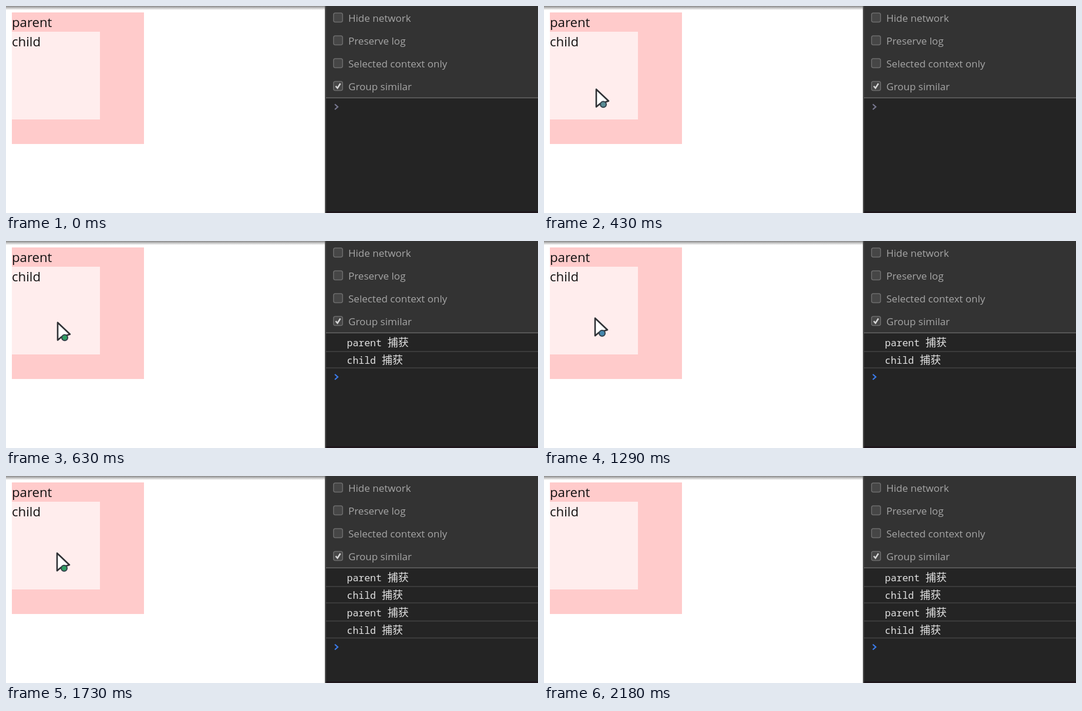
An HTML page that plays this animation: 906x354 px, repeating every 2.83 s.

```html
<!DOCTYPE html>
<html lang="en">
<head>
<meta charset="utf-8">
<title>Event capture demo</title>
<style>
html, body { margin: 0; width: 100%; height: 100%; overflow: hidden; background: #fff; }
svg { display: block; width: 906px; height: 354px; }
.page { font: 22.2px "Open Sans", "Noto Sans", sans-serif; fill: #111; }
.option { font: 17.05px "Open Sans", "Noto Sans", sans-serif; fill: #a6a6a6; }
.log { font: 16.5px "Noto Sans Mono", "DejaVu Sans Mono", monospace; fill: #e2e2e2; white-space: pre; }
.cjk { font: 18px "Noto Sans CJK SC", "Noto Sans CJK", sans-serif; }
</style>
</head>
<body>
<svg viewBox="0 0 906 354">
  <defs>
    <linearGradient id="shade" x2="0" y2="1">
      <stop offset="0" stop-color="#858585"/>
      <stop offset=".35" stop-color="#b5b5b5"/>
      <stop offset="1" stop-color="#fff"/>
    </linearGradient>
  </defs>
  <rect width="906" height="354" fill="#fff"/>
  <rect width="543" height="7" fill="url(#shade)"/>
  <rect x="10" y="11" width="225" height="225" fill="#ffcbcb"/>
  <rect x="10" y="44" width="150" height="150" fill="#ffeded"/>
  <text class="page" x="10" y="36">parent</text>
  <text class="page" x="10" y="69">child</text>

  <rect x="543" width="363" height="354" fill="#242424"/>
  <rect x="545" width="361" height="156" fill="#333"/>
  <rect x="543" width="2" height="354" fill="#505050"/>
  <rect x="545" y="156" width="361" height="2" fill="#565656"/>
  <rect x="545" y="351" width="361" height="3" fill="#1f171c"/>
  <g id="options"></g>
  <g id="logs"></g>
  <path id="prompt" d="M-3 -4.5L2 0L-3 4.5" fill="none" stroke-width="2.2"/>

  <circle id="click" r="18" fill="#fff57c"/>
  <g id="cursor">
    <path d="M1 1.5V31.5L7.5 26L22 21.5Z" fill="#fff" stroke="#303236" stroke-width="2.6" stroke-linejoin="round"/>
    <circle id="dot" cx="13" cy="27.3" r="5" stroke="#33404a" stroke-width="2"/>
  </g>
</svg>
<script>
const LOOP = 2830;
const $ = id => document.getElementById(id);

const BLUE = '#4487ad', TEAL = '#598c95', GREEN = '#2f9e63', GREY = '#a9adb0';

// time, pointer tip, dot colour
const pointer = [
  [0],
  [100, 307, 329, BLUE],
  [210, 238, 259, BLUE],
  [320, 128, 176, BLUE],
  [430, 88, 141, TEAL],
  [530, 87, 138, GREY],
  [630, 87, 138, GREEN],
  [1290, 86, 130.5, BLUE],
  [1410, 86, 130.5, TEAL],
  [1630, 86, 130.5, GREY],
  [1730, 86, 130.5, GREEN],
  [1840, 106, 140, BLUE],
  [1960, 193, 181, BLUE],
  [2060, 362, 327, BLUE],
  [2180]
];
const clicks = [[530, 630, 89, 140], [1630, 1730, 88, 132]];
const logTimes = [630, 630, 1730, 1730];
const dividers = [188, 216, 247, 276];

$('options').innerHTML =
  ['Hide network', 'Preserve log', 'Selected context only', 'Group similar'].map((label, i) => {
    const y = 12 + 39 * i;
    return `<rect x="557.8" y="${y}" width="15.4" height="15.4" rx="3" fill="#464646" stroke="#6c6c6c" stroke-width="1.5"/>
      <text class="option" x="583" y="${y + 14.5}">${label}</text>`;
  }).join('') +
  '<path d="M561.5 137L564.5 140.5L569.5 132.5" fill="none" stroke="#d6d6d6" stroke-width="2.5"/>';

$('logs').innerHTML = dividers.map((y, i) =>
  `<g><text class="log" x="580.5" y="${180 + 30 * i}">${i % 2 ? 'child' : 'parent'} <tspan class="cjk">捕获</tspan></text>
   <rect x="545" y="${y}" width="361" height="2" fill="#3b3b3b"/></g>`).join('');
const rows = [...$('logs').children];

const show = (el, on) => el.setAttribute('visibility', on ? 'visible' : 'hidden');
const move = (el, x, y) => el.setAttribute('transform', `translate(${x} ${y})`);

function render(t) {
  const [, x, y, color] = pointer.findLast(step => step[0] <= t);
  show($('cursor'), color);
  if (color) {
    move($('cursor'), x, y);
    $('dot').setAttribute('fill', color);
  }

  const click = clicks.find(([from, to]) => t >= from && t < to);
  show($('click'), click);
  if (click) move($('click'), click[2], click[3]);

  rows.forEach((row, i) => show(row, t >= logTimes[i]));
  const count = logTimes.filter(time => t >= time).length;
  move($('prompt'), 563, 172.5 + 30 * count);
  $('prompt').setAttribute('stroke', count ? '#3b7bea' : '#77778f');
}

const start = performance.now();
function tick() {
  render((performance.now() - start) % LOOP);
  requestAnimationFrame(tick);
}
tick();
</script>
</body>
</html>
```
